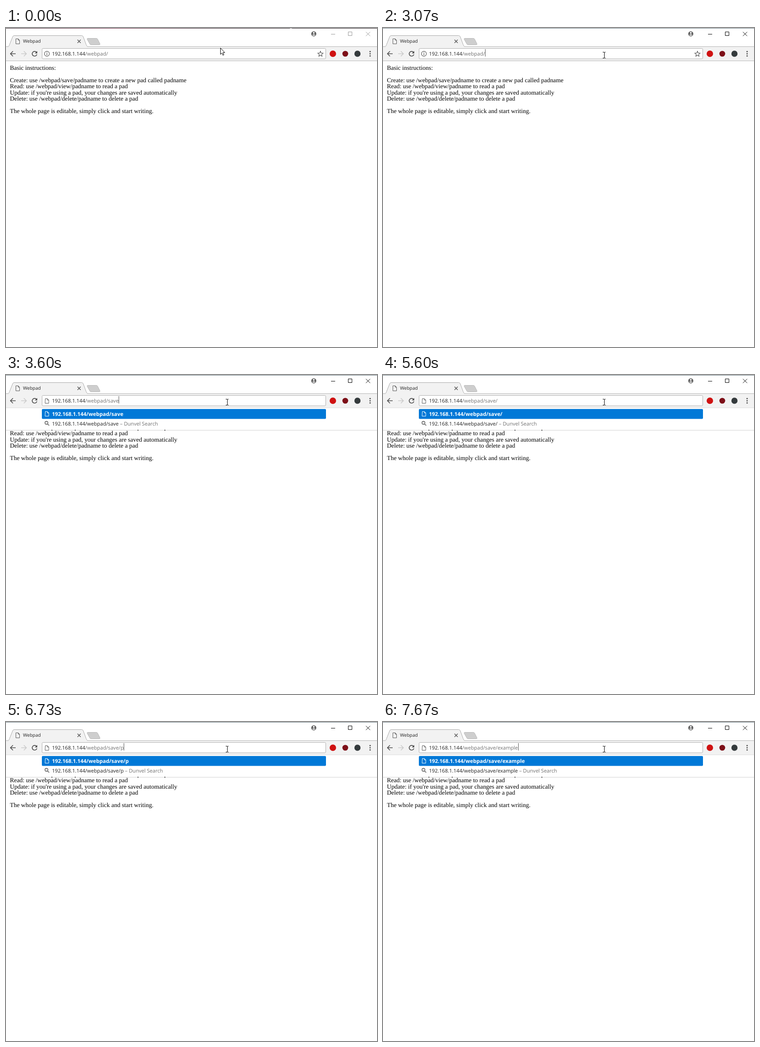
An HTML page that plays this animation: 807 px wide and 694 px high, repeating every 8000 ms.

```html
<!DOCTYPE html>
<html lang="en">
<head>
<meta charset="utf-8">
<title>Webpad</title>
<style>
  html, body { margin: 0; width: 100%; height: 100%; overflow: hidden; background: #fff; }
  svg { display: block; width: 807px; height: 694px; }
  text { white-space: pre; text-rendering: geometricPrecision; }
  .ui { font: 11.1px "Open Sans", "Noto Sans", sans-serif; fill: #222; }
  .tab { font-size: 10px; }
  .bold { font-size: 11.42px; font-weight: 700; fill: #fff; }
  .dim { fill: #707070; }
  .page { font: 13.48px "Liberation Serif", serif; fill: #000; }
  .line { fill: none; stroke: #5a5a5a; }
</style>
</head>
<body>
<svg viewBox="0 0 807 694">
  <defs>
    <linearGradient id="behind">
      <stop offset="0" stop-color="#3a2a33"/>
      <stop offset=".3" stop-color="#6b2a42"/>
      <stop offset=".5" stop-color="#35202b"/>
      <stop offset=".764" stop-color="#2b2228"/>
      <stop offset=".768" stop-color="#c8c4c6"/>
      <stop offset=".772" stop-color="#2b2228"/>
    </linearGradient>
    <path id="doc" d="M.5 .5h4.500l3 3v7h-8zM5 .5v3h3"/>
  </defs>
  <rect width="807" height="694" fill="#fff"/>
  <rect id="edge" width="807" height="1"/>

  <!-- tab strip and toolbar -->
  <rect y="40" width="807" height="31" fill="#f2f2f2"/>
  <path d="M0 40.500H807" stroke="#b4b4b4"/>
  <path d="M0 71.500H807" stroke="#b6b6b6"/>
  <path d="M4 41C6 40 6.500 39 7.500 36.500L14.500 19Q15.500 16.500 18 16.500H164.500Q167 16.500 168 19L174.500 36.500Q176 40 178 41" fill="#f2f2f2" stroke="#a9a9a9"/>
  <path d="M178 22.500H196.500Q198.500 22.500 199.300 24.300L204.500 34.500Q205 36.500 203 36.500H185Q183 36.500 182.200 34.700L176.500 24.500Q176 22.500 178 22.500Z" fill="#cecece" stroke="#b9b9b9"/>
  <path class="line" d="M21.500 23.500h5l3 3v8h-8zM26.500 23.500v3h3"/>
  <text class="ui tab" x="37" y="32">Webpad</text>
  <path class="line" d="M155.500 25.500l7 7m0-7l-7 7" stroke-width="1.500"/>

  <!-- window controls -->
  <g fill="#5f5f5f">
    <circle cx="669.500" cy="12.700" r="5.500"/>
    <circle cx="669.500" cy="10.700" r="1.900" fill="#fff"/>
    <path d="M666 15.300Q669.500 12.500 673 15.300Q669.500 18.200 666 15.300" fill="#fff"/>
  </g>
  <path id="controls" fill="none" d="M707 13.500h9M744.500 8.500h8v8h-8zM783 8.500l9 9m0-9l-9 9"/>

  <!-- navigation -->
  <g fill="none" stroke-width="1.700">
    <path d="M21 56H10M15.200 50.500L9.700 56l5.500 5.500" stroke="#505050"/>
    <path d="M33 56H44M38.800 50.500l5.500 5.500l-5.500 5.500" stroke="#cbcbcb"/>
    <path d="M66.300 52.800A5.200 5.200 0 1 0 67.200 57.500" stroke="#505050"/>
  </g>
  <path d="M68 50v5.200h-5.200z" fill="#505050"/>
  <rect x="78.500" y="44.500" width="617" height="22.500" rx="2" fill="#fff" stroke="#b0b0b0"/>
  <g id="idle">
    <circle class="line" cx="89" cy="56" r="5.400" stroke-width="1.200"/>
    <path class="line" d="M89 55v4M89 52.500v1.400" stroke-width="1.300"/>
    <path class="line" stroke-width="1.200" d="M684 50.500l1.600 3.800l4.100 .4l-3.100 2.700l.9 4l-3.500-2.100l-3.500 2.100l.9-4l-3.100-2.700l4.100-.4z"/>
  </g>
  <use id="urlDoc" class="line" href="#doc" x="85" y="51"/>
  <text class="ui" x="100" y="60" id="url"><tspan>192.168.1.144</tspan><tspan class="dim" id="path"></tspan></text>
  <rect id="caret" y="46" width="1" height="16" fill="#555"/>
  <circle cx="711" cy="56" r="7" fill="#cf1111"/>
  <circle cx="738" cy="56" r="6.300" fill="#7d0f18"/>
  <circle cx="764.500" cy="56" r="6.700" fill="#343a3c"/>
  <g fill="#505050">
    <circle cx="792" cy="51.300" r="1.500"/>
    <circle cx="792" cy="56" r="1.500"/>
    <circle cx="792" cy="60.700" r="1.500"/>
  </g>

  <g class="page" id="page"></g>

  <!-- suggestions -->
  <g id="list">
    <rect y="71" width="807" height="48" fill="#fff"/>
    <path d="M0 71.500H807" stroke="#dedede"/>
    <path d="M0 119.500H807" stroke="#000" stroke-opacity=".06"/>
    <path d="M0 120.500H807" stroke="#000" stroke-opacity=".12"/>
    <rect x="78" y="74" width="618" height="21.500" rx="2" fill="#0078d7"/>
    <use href="#doc" x="85" y="79" fill="none" stroke="#fff"/>
    <text class="ui bold" x="100" y="89" id="pick"></text>
    <g class="line" stroke-width="1.400">
      <circle cx="88" cy="104" r="3.200"/>
      <path d="M90.400 106.400l3.600 3.600"/>
    </g>
    <text class="ui" x="100" y="110"><tspan id="query"></tspan><tspan class="dim"> – Dunvel Search</tspan></text>
  </g>

  <path id="arrow" d="M.5 .5V14.300L3.600 11.400L5.800 16.300L8 15.300L5.900 10.600H10z" fill="#fff" stroke="#000"/>
  <path id="beam" d="M-3 -6.500H-1L.5 -5.800L2 -6.500H3M.5 -6V6M-3 6.500H-1L.5 5.800L2 6.500H3" fill="none" stroke="#000"/>
</svg>
<script>
const LOOP = 8000, FOCUS = 2000, TYPE = 3330;
const HOST = "192.168.1.144", BASE = "/webpad/";
const $ = id => document.getElementById(id);

const lines = [
  [91, "Basic instructions:"],
  [118, "Create: use /webpad/save/padname to create a new pad called padname"],
  [131, "Read: use /webpad/view/padname to read a pad"],
  [145, "Update: if you're using a pad, your changes are saved automatically"],
  [158, "Delete: use /webpad/delete/padname to delete a pad"],
  [185, "The whole page is editable, simply click and start writing."]
];
$("page").innerHTML = lines.map(([y, s]) => `<text x="8.500" y="${y}">${s}</text>`).join("");

// time, text after the base path
const typed = [
  [0, ""], [3330, "s"], [3400, "sa"], [3470, "sav"], [3600, "save"], [4070, "save/"],
  [6000, "save/p"], [6070, "save/pa"], [6130, "save/pad"],
  [6670, "save/pa"], [6730, "save/p"], [6870, "save/"], [6930, "save/e"],
  [7070, "save/ex"], [7270, "save/exa"], [7330, "save/exam"], [7400, "save/examp"],
  [7600, "save/exampl"], [7670, "save/example"]
];
// the suggestions catch up late after these words
const late = { "save/pad": 6200, "save/ex": 7130 };
const blink = [[0, 0], [2000, 1], [2530, 0], [3070, 1], [4600, 0], [5130, 1], [5600, 0], [6000, 1]];
// time, x, y, text beam
const pointer = [[0, 466, 43, 0], [200, 467, 44, 0], [267, 472, 51, 1], [333, 478, 56, 1], [400, 481, 59, 1]];

const indexAt = (table, t) => table.findLastIndex(step => step[0] <= t);
const show = (id, on) => $(id).setAttribute("visibility", on ? "visible" : "hidden");

function setText(id, s) {
  if ($(id).textContent !== s) $(id).textContent = s;
}

function draw(t) {
  const focused = t >= FOCUS, typing = t >= TYPE;
  const i = indexAt(typed, t);
  const word = typed[i][1];
  const hint = t < late[word] ? typed[i - 1][1] : word;

  $("edge").setAttribute("fill", focused ? "#73828a" : "url(#behind)");
  $("controls").setAttribute("stroke", focused ? "#000" : "#999");
  show("idle", !typing);
  show("urlDoc", typing);
  show("list", typing);

  setText("path", BASE + word);
  setText("pick", HOST + BASE + hint);
  setText("query", HOST + BASE + hint);
  $("caret").setAttribute("x", Math.round(100.25 + $("url").getComputedTextLength()));
  show("caret", blink[indexAt(blink, t)][1]);

  const [, x, y, beam] = pointer[indexAt(pointer, t)];
  for (const id of ["arrow", "beam"]) $(id).setAttribute("transform", `translate(${x} ${y})`);
  show("arrow", !beam);
  show("beam", beam);
}

const start = performance.now();
function tick() {
  draw((performance.now() - start) % LOOP);
  requestAnimationFrame(tick);
}
tick();
</script>
</body>
</html>
```
